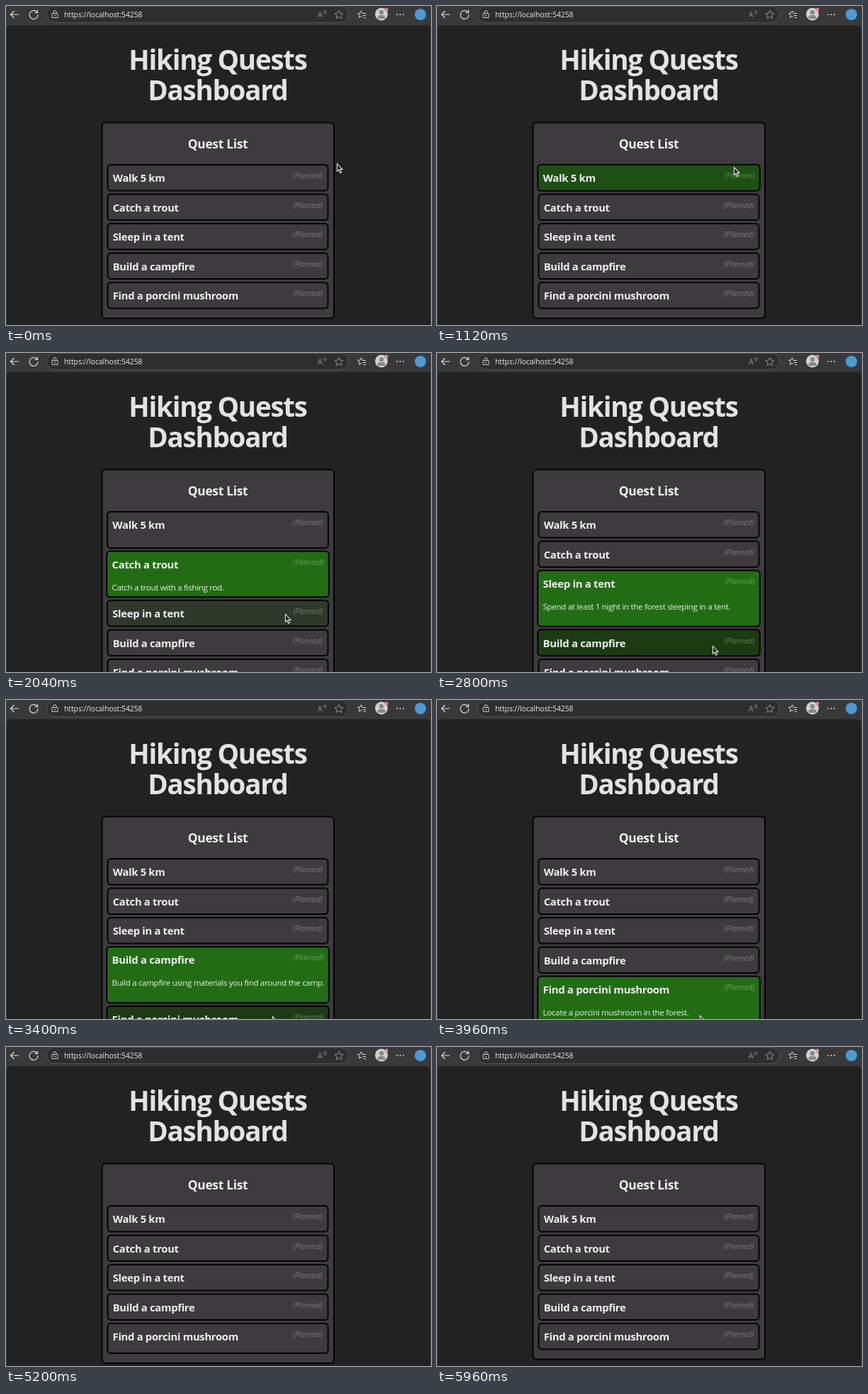
These frames come from a looping animation (600 by 450 pixels, 6 s). An HTML page with a canvas:

```html
<!DOCTYPE html>
<html lang="en">
<head>
<meta charset="utf-8">
<title>Hiking Quests Dashboard</title>
<style>
html, body { margin: 0; width: 100%; height: 100%; overflow: hidden; background: #232223; }
canvas { display: block; width: 600px; height: 450px; }
</style>
</head>
<body>
<canvas id="stage" width="600" height="450"></canvas>
<script>
const ctx = document.getElementById('stage').getContext('2d');
const LOOP = 6000;
const FONT = '"Open Sans", "Noto Sans", sans-serif';
const ITEM_H = 38.5, OPEN_H = 42, GAP = 3, LEFT = 142.5, WIDTH = 313;
const OPEN_DELAY = 230, OPEN_TIME = 350;

// on / off: when the pointer enters and leaves each quest
const quests = [
  { title: 'Walk 5 km', text: 'Walk 5 km in the forest.', on: 920, off: 1600 },
  { title: 'Catch a trout', text: 'Catch a trout with a fishing rod.', on: 1600, off: 2000 },
  { title: 'Sleep in a tent', text: 'Spend at least 1 night in the forest sleeping in a tent.', on: 2000, off: 2680 },
  { title: 'Build a campfire', text: 'Build a campfire using materials you find around the camp.', on: 2680, off: 3280 },
  { title: 'Find a porcini mushroom', text: 'Locate a porcini mushroom in the forest.', on: 3280, off: 4700 }
];

// Pointer path: time, x, y
const path = [
  [0, 467, 222], [640, 467, 222], [920, 453, 223], [1120, 419, 227],
  [1600, 402, 306], [2000, 395, 358], [2040, 394, 368], [2680, 391, 394],
  [2800, 389, 413], [3280, 378, 434], [3400, 376, 446], [3800, 372, 446],
  [4200, 369, 443], [4640, 369, 443], [4800, 366, 470]
];

const GRAY = [61, 59, 61], DARK = [27, 53, 18], GREEN = [34, 109, 20];

const ramp = (t, start, length) => Math.min(1, Math.max(0, (t - start) / length));
const smooth = p => p * p * (3 - 2 * p);
const mix = (a, b, p) => a.map((v, i) => v + (b[i] - v) * p);

function hoverColor(level) {
  const c = level < 0.31 ? mix(GRAY, DARK, level / 0.31) : mix(DARK, GREEN, (level - 0.31) / 0.69);
  return `rgb(${c.map(Math.round)})`;
}

function text(str, x, y, style, size, color, spacing = 0, align = 'left') {
  ctx.font = `${style} ${size}px ${FONT}`;
  ctx.letterSpacing = spacing + 'px';
  ctx.textAlign = align;
  ctx.fillStyle = color;
  ctx.fillText(str, x, y);
}

function box(x, y, w, h, r, fill, stroke, line) {
  ctx.beginPath();
  ctx.roundRect(x, y, w, h, r);
  ctx.fillStyle = fill;
  ctx.fill();
  if (!stroke) return;
  ctx.strokeStyle = stroke;
  ctx.lineWidth = line;
  ctx.stroke();
}

function disc(x, y, r, color) {
  ctx.beginPath();
  ctx.arc(x, y, r, 0, Math.PI * 2);
  ctx.fillStyle = color;
  ctx.fill();
}

function line(d, color, width = 1.2) {
  ctx.strokeStyle = color;
  ctx.lineWidth = width;
  ctx.stroke(new Path2D(d));
}

function star(x, y, r, color) {
  ctx.beginPath();
  for (let i = 0; i < 10; i++) {
    const a = i * Math.PI / 5 - Math.PI / 2, d = i % 2 ? r * 0.48 : r;
    ctx.lineTo(x + d * Math.cos(a), y + d * Math.sin(a));
  }
  ctx.closePath();
  ctx.strokeStyle = color;
  ctx.lineWidth = 1;
  ctx.stroke();
}

function toolbar() {
  const bar = '#3a393a', light = '#dedede', dim = '#929092';
  ctx.fillStyle = bar;
  ctx.fillRect(0, 0, 600, 450);
  box(1, 27, 598, 440, 5, '#232223');
  line('M18 12H6.5M11.5 7L6.5 12L11.5 17', light);
  line('M44 9A6 6 0 1 0 45 12M44.5 5.5V9.5H40.5', light);
  box(57.5, 0.5, 426, 23, 11.5, '#2f2e2f', '#545254', 1);
  line('M65 10.5H73V16.5H65ZM67 10.5V8.5A2 2 0 0 1 71 8.5V10.5', '#c8c8c8', 1);
  disc(69, 13.5, 0.9, '#c8c8c8');
  text('https://localhost:54258', 82, 16, '400', 10.3, '#ececec');
  text('A', 440, 16, '400', 10.5, dim);
  line('M448 7Q450 9 448 11M450.5 6Q453 9 450.5 12', dim, 0.9);
  star(470, 12.5, 6.3, dim);
  star(501.5, 12, 5.2, light);
  ctx.fillStyle = bar;
  ctx.fillRect(503, 9, 7, 9);
  line('M503 10.5H508M504 13.5H508M505 16.5H508', light, 1.1);
  disc(530, 11.5, 9, '#d4d1d1');
  disc(530, 9, 3.2, '#8b8789');
  box(524.5, 13, 11, 5, [5, 5, 2, 2], '#8b8789');
  disc(537, 5, 2.5, '#d98a91');
  for (const x of [552, 556.5, 561]) disc(x, 12, 1, light);
  disc(585, 12, 8, '#4a9bd8');
}

function quest(q, y, open, t) {
  const level = ramp(t, q.on, 320) - ramp(t, q.off + 150, 280);
  const grow = ramp(t, q.on, 100) - ramp(t, q.off + 250, 280);
  const h = ITEM_H + open, cx = LEFT + WIDTH / 2, cy = y + h / 2, scale = 1 + 0.008 * grow;
  ctx.save();
  ctx.translate(cx, cy);
  ctx.scale(scale, scale);
  ctx.translate(-cx, -cy);
  box(LEFT + 1, y + 1, WIDTH - 2, h - 2, 4.5, hoverColor(level), '#020202', 2);
  text(q.title, 150.7, y + 25, '700', 14.8, '#efefef', -0.3);
  text('(Planned)', 447.2, y + 20, 'italic 400', 10.1, 'rgba(255,255,255,.33)', 0, 'right');
  if (open > 0) {
    ctx.beginPath();
    ctx.rect(LEFT, y + 30, WIDTH, h - 37);
    ctx.clip();
    text(q.text, 150.7, y + 55.5, '400', 11.4, '#eeeeee', -0.28);
  }
  ctx.restore();
}

function pointer(t) {
  const i = path.findIndex(p => p[0] > t);
  if (i < 0) return;
  const a = path[i - 1], b = path[i], p = (t - a[0]) / (b[0] - a[0]);
  const [, x, y] = mix(a, b, p);
  ctx.save();
  ctx.translate(x, y);
  ctx.scale(0.93, 0.93);
  const arrow = new Path2D('M.5 .5V12L3 9.7L5 14.3L7 13.4L5 9H8.6Z');
  ctx.fillStyle = '#1c1c1c';
  ctx.fill(arrow);
  ctx.strokeStyle = '#f2f2f2';
  ctx.lineWidth = 1.1;
  ctx.stroke(arrow);
  ctx.restore();
}

function draw(t) {
  toolbar();
  text('Hiking Quests', 299, 90, '700', 38.5, '#e3e3e3', -1.25, 'center');
  text('Dashboard', 299, 133, '700', 38.5, '#e3e3e3', -1.25, 'center');

  const opens = quests.map(q => OPEN_H * (
    smooth(ramp(t, q.on + OPEN_DELAY, OPEN_TIME)) - smooth(ramp(t, q.off + OPEN_DELAY, OPEN_TIME))));
  const extra = opens.reduce((sum, v) => sum + v, 0);
  box(135.5, 164.5, 327.5, 276 + extra, 5, '#3d3b3d', '#020202', 2);
  text('Quest List', 299, 201, '700', 17.4, '#efefef', -0.3, 'center');

  let y = 223;
  quests.forEach((q, i) => {
    quest(q, y, opens[i], t);
    y += ITEM_H + GAP + opens[i];
  });
  pointer(t);
}

const start = performance.now();
function frame() {
  draw((performance.now() - start) % LOOP);
  requestAnimationFrame(frame);
}
frame();
</script>
</body>
</html>
```
